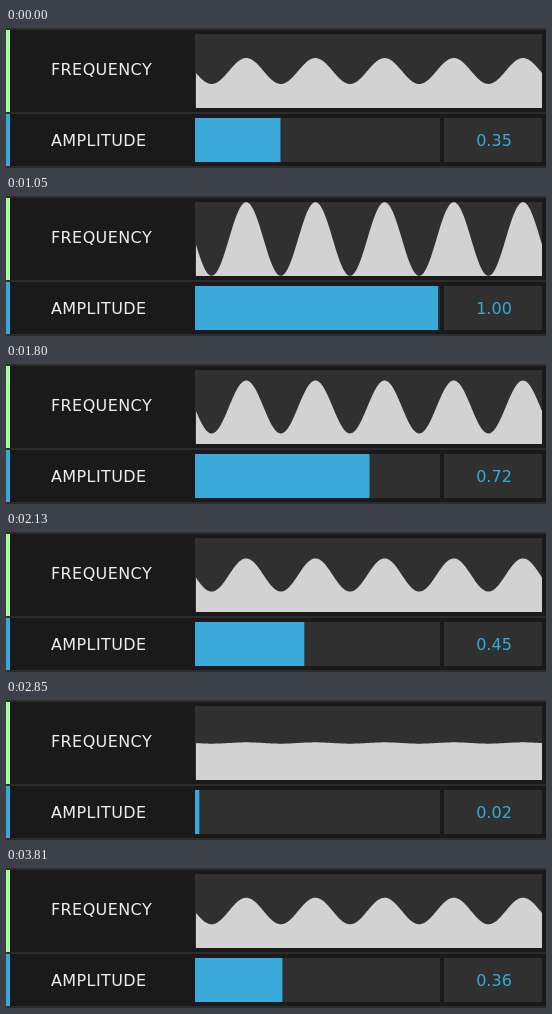
Recreate the animation shown at these times as an HTML page. Size 540 by 140 pixels, loop 3.84 s.

```html
<!DOCTYPE html>
<html lang="en">
<head>
<meta charset="utf-8">
<title>Amplitude slider</title>
<style>
  html, body { margin: 0; width: 100%; height: 100%; overflow: hidden; background: #1a1a1a; }
  svg { display: block; }
  text { font: 16px "DejaVu Sans", sans-serif; fill: #eee; }
  .label { letter-spacing: .4px; }
  .line { fill: #2c2c2c; }
  .well { fill: #303030; }
  .blue, #value { fill: #38a9d8; }
</style>
</head>
<body>
<svg width="540" height="140" viewBox="0 0 540 140">
  <rect class="line" width="540" height="2"/>
  <rect class="line" y="84" width="540" height="2"/>
  <rect class="line" y="138" width="540" height="2"/>

  <rect y="2" width="4" height="82" fill="#a6ff9c"/>
  <text class="label" x="45" y="47">FREQUENCY</text>
  <rect class="well" x="189" y="6" width="347" height="74"/>
  <path id="wave" fill="#d2d2d2"/>

  <rect class="blue" y="86" width="4" height="52"/>
  <text class="label" x="45" y="118">AMPLITUDE</text>
  <rect class="well" x="189" y="90" width="245" height="44"/>
  <rect class="blue" id="bar" x="189" y="90" height="44"/>
  <rect class="well" x="438" y="90" width="98" height="44"/>
  <text id="value" x="488" y="118" text-anchor="middle"></text>
</svg>
<script>
const LOOP = 3840, TICK = 30;
const LEFT = 190, RIGHT = 536, BOTTOM = 80, MIDDLE = 43, HEIGHT = 37;
const PERIOD = (RIGHT - LEFT) / 5, ZERO_X = 188.3;
const [wave, bar, value] = ["wave", "bar", "value"].map(id => document.getElementById(id));

function amplitudeAt(ms) {
  let tick = Math.floor(ms / TICK);
  if (tick > 110) tick--; // the slider pauses for one tick here
  return 0.5 + 0.5 * Math.cos(tick * 0.05 - 1.875);
}

function wavePath(amplitude) {
  let d = `M${LEFT} ${BOTTOM}`;
  for (let x = LEFT; x <= RIGHT; x++) {
    const y = MIDDLE + HEIGHT * amplitude * Math.sin(2 * Math.PI * (x - ZERO_X) / PERIOD);
    d += `L${x} ${y.toFixed(2)}`;
  }
  return d + `V${BOTTOM}Z`;
}

function draw() {
  const amplitude = amplitudeAt(performance.now() % LOOP);
  wave.setAttribute("d", wavePath(amplitude));
  bar.setAttribute("width", 244 * amplitude);
  value.textContent = amplitude.toFixed(2);
  requestAnimationFrame(draw);
}
draw();
</script>
</body>
</html>
```
